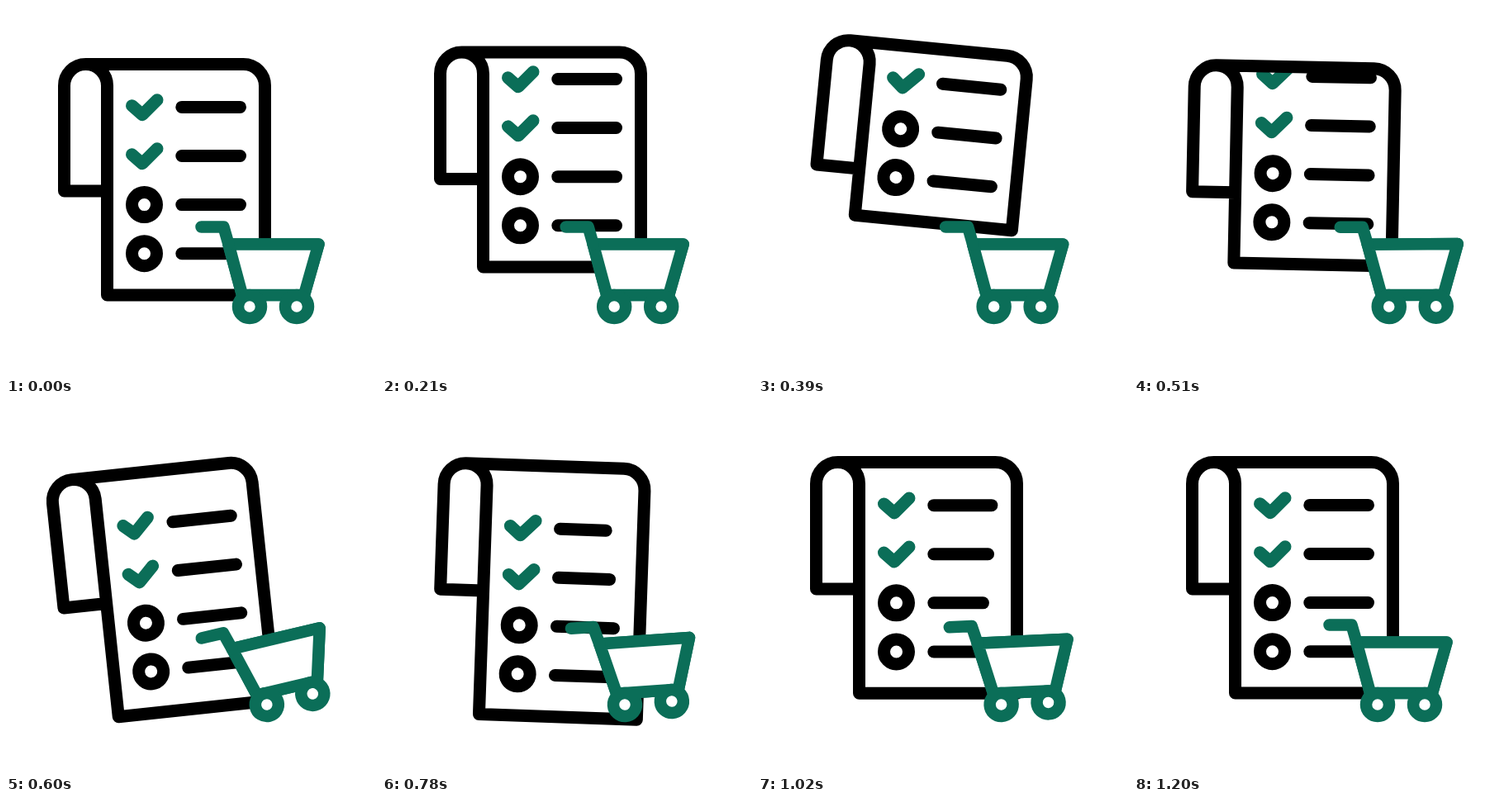
An HTML page with a canvas that plays this animation: 448 by 448 pixels, repeating every 1500 ms.

```html
<!DOCTYPE html>
<html lang="en">
<head>
<meta charset="utf-8">
<title>Shopping list</title>
<style>
  html, body { margin: 0; width: 100%; height: 100%; overflow: hidden; background: #fff; }
  canvas { display: block; width: 448px; height: 448px; }
</style>
</head>
<body>
<canvas id="stage" width="448" height="448"></canvas>
<script>
const ctx = document.getElementById('stage').getContext('2d');
const LOOP = 1500, STEP = 30;
const BLACK = '#000', GREEN = '#0b6e58', WHITE = '#fff';
const LEFT = 122.5, RIGHT = 313.5, TOP = 70.5, BOTTOM = 350;
const FLAP_LEFT = 70.5, FLAP_BOTTOM = 224, RADIUS = 26;
const ROW_TOP = 122.4, ROW_GAP = 59.1, ROW_DELAY = 60;

// Sine ease from 0 to 1 between two times.
function ease(t, start, end) {
  const u = Math.min(1, Math.max(0, (t - start) / (end - start)));
  return (1 - Math.cos(Math.PI * u)) / 2;
}

// Each motion is a chain of eased moves that ends where it began.
const paperLift = t => -32 * ease(t, 45, 395) + 55 * ease(t, 395, 600) - 23 * ease(t, 600, 790);
const paperTilt = t => 6.2 * ease(t, 220, 435) - 12.3 * ease(t, 435, 605)
  + 8.1 * ease(t, 605, 785) - 2 * ease(t, 785, 980);
const paperStretch = t => -71 * ease(t, 97, 420) + 96 * ease(t, 420, 657) - 25 * ease(t, 735, 1040);
const cartShift = t => -15 * ease(t, 30, 250) + 36 * ease(t, 320, 590)
  - 22 * ease(t, 590, 780) + ease(t, 780, 1200);
const cartTilt = t => -13.3 * ease(t, 500, 600) + 9.3 * ease(t, 600, 780) + 4 * ease(t, 900, 1200);
const lineTrim = t => 16 * (ease(t, 620, 810) - ease(t, 810, 1050));

function stroke(color, points, close) {
  ctx.beginPath();
  points.forEach(([x, y]) => ctx.lineTo(x, y));
  if (close) ctx.closePath();
  ctx.strokeStyle = color;
  ctx.stroke();
}

function ring(color, x, y, r) {
  ctx.beginPath();
  ctx.arc(x, y, r, 0, 2 * Math.PI);
  ctx.fillStyle = WHITE;
  ctx.fill();
  ctx.strokeStyle = color;
  ctx.stroke();
}

// Moves the pivot by (dx, dy) and turns everything around it.
function pose(x, y, dx, dy, degrees) {
  ctx.translate(x + dx, y + dy);
  ctx.rotate(degrees * Math.PI / 180);
  ctx.translate(-x, -y);
}

function drawRow(index, y, t) {
  if (index < 2) stroke(GREEN, [[152.5, y - 1.7], [165, y + 9.3], [183, y - 8.7]]);
  else ring(BLACK, 167.5, y, 15);
  stroke(BLACK, [[212.8, y], [283.5 - lineTrim(t - index * ROW_DELAY), y]]);
}

function drawPaper(t) {
  const stretch = paperStretch(t), bottom = BOTTOM + stretch;
  ctx.save();
  pose(FLAP_LEFT, FLAP_BOTTOM + 5, 0, paperLift(t), paperTilt(t));
  ctx.lineWidth = 15;

  // Rows slide under the top edge of the sheet.
  ctx.save();
  ctx.beginPath();
  ctx.rect(LEFT, TOP, RIGHT - LEFT, BOTTOM);
  ctx.clip();
  for (let i = 0; i < 4; i++) drawRow(i, ROW_TOP + i * ROW_GAP + stretch, t);
  ctx.restore();

  ctx.beginPath();
  ctx.moveTo(LEFT, FLAP_BOTTOM);
  ctx.lineTo(FLAP_LEFT, FLAP_BOTTOM);
  ctx.arc(FLAP_LEFT + RADIUS, TOP + RADIUS, RADIUS, Math.PI, 0);
  ctx.lineTo(LEFT, bottom);
  ctx.lineTo(RIGHT, bottom);
  ctx.arc(RIGHT - RADIUS, TOP + RADIUS, RADIUS, 0, -Math.PI / 2, true);
  ctx.lineTo(FLAP_LEFT + RADIUS, TOP);
  ctx.strokeStyle = BLACK;
  ctx.stroke();
  ctx.restore();
}

function drawCart(t) {
  const rearWheel = 295, frontWheel = 352, axle = 364;
  ctx.save();
  pose(rearWheel, axle, cartShift(t), 0, cartTilt(t));
  ctx.lineWidth = 14.5;
  const basket = [[269.5, 288.5], [378.5, 288.5], [361, 350], [286, 350]];
  stroke(GREEN, basket, true);
  ctx.fillStyle = WHITE;
  ctx.fill();
  stroke(GREEN, basket, true);
  stroke(GREEN, [[236.5, 267.5], [263.5, 267.5], basket[0]]);
  ring(GREEN, rearWheel, axle, 14);
  ring(GREEN, frontWheel, axle, 14);
  ctx.restore();
}

function render(now) {
  const t = Math.floor(now % LOOP / STEP) * STEP;
  ctx.fillStyle = WHITE;
  ctx.fillRect(0, 0, 448, 448);
  ctx.lineCap = ctx.lineJoin = 'round';
  drawPaper(t);
  drawCart(t);
}

const start = performance.now();
function tick() {
  render(performance.now() - start);
  requestAnimationFrame(tick);
}
tick();
</script>
</body>
</html>
```
